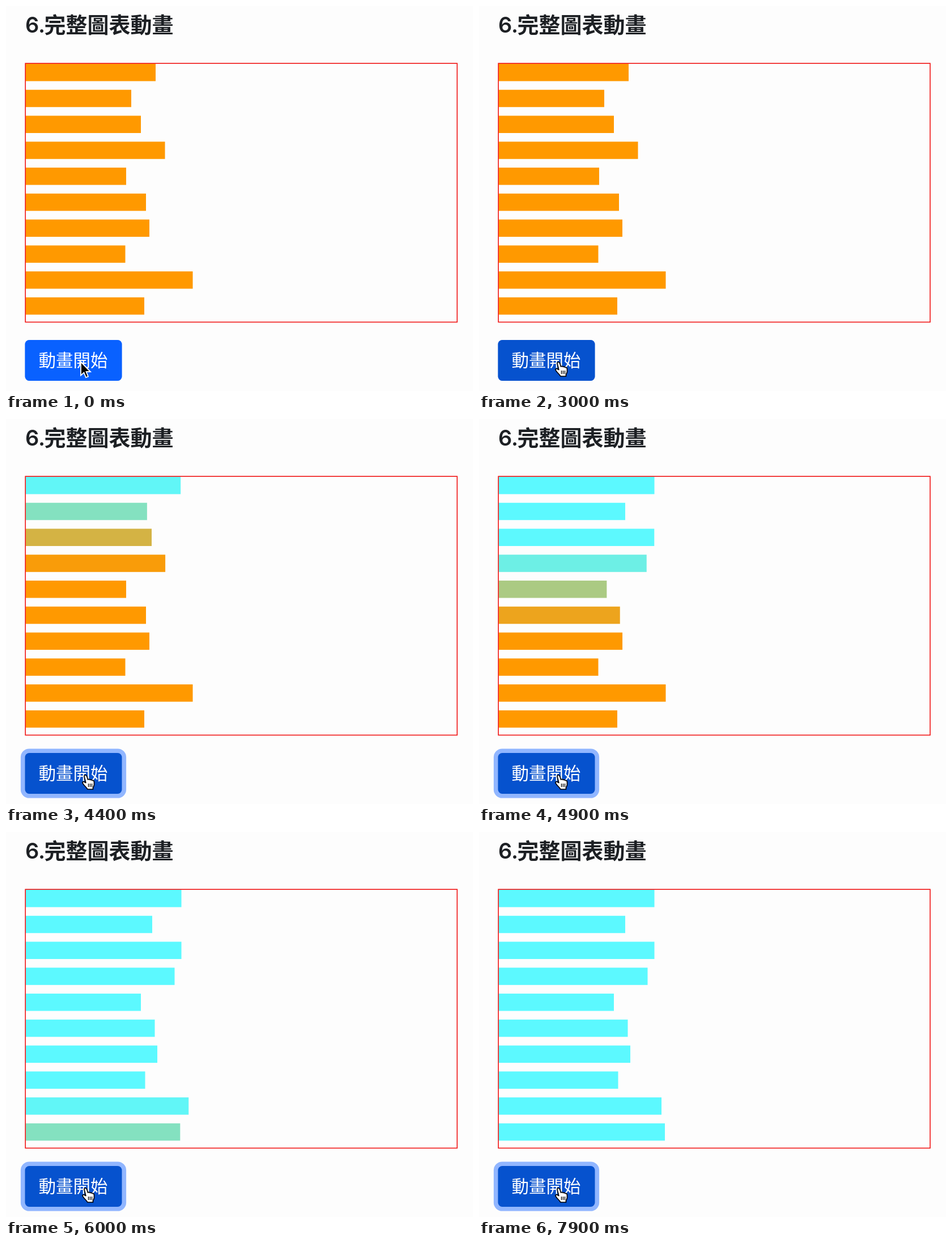
Animation of 824 by 679 pixels, one loop 8000 ms. Source, as an HTML page:

```html
<!DOCTYPE html>
<html lang="zh-Hant">
<head>
<meta charset="utf-8">
<style>
  html, body { margin: 0; width: 100%; height: 100%; overflow: hidden; background: #fdfdfd; }
  svg { display: block; width: 824px; height: 679px; }
  text { font-family: Inter, "Noto Sans CJK TC", "Noto Sans CJK JP", "Noto Sans CJK", sans-serif; }
  .title { font-size: 38px; font-weight: 600; fill: #1d2024; }
  .label { font-size: 30.5px; fill: #fff; }
</style>
</head>
<body>
<svg viewBox="0 0 824 679">
  <text class="title" y="47"><tspan x="34">6.</tspan><tspan x="67.5">完整圖表動畫</tspan></text>
  <g id="bars"></g>
  <rect x="34.2" y="101.2" width="761.8" height="456.3" fill="none" stroke="#f01414" stroke-width="1.6"/>
  <rect id="ring" fill="#91b6ff"/>
  <rect id="button" x="33.5" y="589" width="171" height="72" rx="7.6"/>
  <text class="label" x="57.5" y="636">動畫開始</text>
  <path id="arrow" transform="translate(132 627.5)" d="M0 0V24L5.5 19 9 27.5 13 26 9.5 17.5H17Z"
        fill="#000" stroke="#fff" stroke-width="1.8"/>
  <g id="hand" stroke="#000" stroke-width="1.7" stroke-linejoin="round">
    <path fill="#fff" d="M4 3.5Q4 1 6 1T8.8 3.5L10.5 9Q12.5 7.5 14.5 9.5 17 8.5 18 10.5 21 10 21.5 13V18Q21 21 19.5 23V26H10Q8 23 4 19 1 15.5 1 14 2 11.5 5 13.5L6.8 14.5Z"/>
    <path fill="none" stroke-width="1.3" d="M11.5 16v6M14.5 16v6M17.5 16v6"/>
  </g>
</svg>
<script>
const LOOP = 8000, STEP = 100;
const HOVER = 1600, FOCUS = 3480, START = 3595;
const LEFT = 35, TOP = 102, PITCH = 45.76;
const before = [264, 221, 238, 280.5, 212, 247, 253, 210.5, 329.5, 244];
const after = [309.5, 258, 309.5, 297.5, 238, 262.5, 267, 245.5, 322, 328];
// time, x, y of the hand
const path = [[1600, 125, 630], [1700, 125.5, 631], [2200, 134, 649], [2700, 136, 648], [2950, 134, 627]];

const $ = id => document.getElementById(id);
const set = (el, attrs) => { for (const k in attrs) el.setAttribute(k, attrs[k]); };
const clamp = v => Math.min(1, Math.max(0, v));
const lerp = (a, b, p) => a + (b - a) * p;
const mix = (a, b, p) => `rgb(${a.map((v, i) => Math.round(lerp(v, b[i], p)))})`;
const cubicInOut = p => p < .5 ? 4 * p ** 3 : 1 - 4 * (1 - p) ** 3;
const easeOut = p => 1 - (1 - p) ** 2;

const bars = before.map((_, i) => {
  const bar = document.createElementNS("http://www.w3.org/2000/svg", "rect");
  set(bar, { x: LEFT, y: TOP + i * PITCH, height: 30.5 });
  return $("bars").appendChild(bar);
});

function handAt(t) {
  let i = 0;
  while (i < path.length - 2 && t > path[i + 1][0]) i++;
  const [a, b] = [path[i], path[i + 1]];
  const p = clamp((t - a[0]) / (b[0] - a[0]));
  return [lerp(a[1], b[1], p), lerp(a[2], b[2], p)];
}

function draw(t) {
  bars.forEach((bar, i) => {
    const p = cubicInOut(clamp((t - START - i * 200) / 1000));
    set(bar, {
      width: lerp(before[i], after[i], p) - LEFT,
      fill: mix([255, 153, 0], [92, 249, 255], p)
    });
  });

  const hovered = t >= HOVER;
  set($("button"), { fill: mix([9, 97, 255], [6, 82, 206], easeOut(clamp((t - HOVER) / 150))) });
  set($("arrow"), { visibility: hovered ? "hidden" : "visible" });
  set($("hand"), { visibility: hovered ? "visible" : "hidden", transform: `translate(${handAt(t)})` });

  const r = 7.6 * easeOut(clamp((t - FOCUS) / 150));
  set($("ring"), { x: 33.5 - r, y: 589 - r, width: 171 + 2 * r, height: 72 + 2 * r, rx: 7.6 + r });
}

function tick() {
  draw(Math.floor(performance.now() % LOOP / STEP) * STEP);
  requestAnimationFrame(tick);
}
tick();
</script>
</body>
</html>
```
